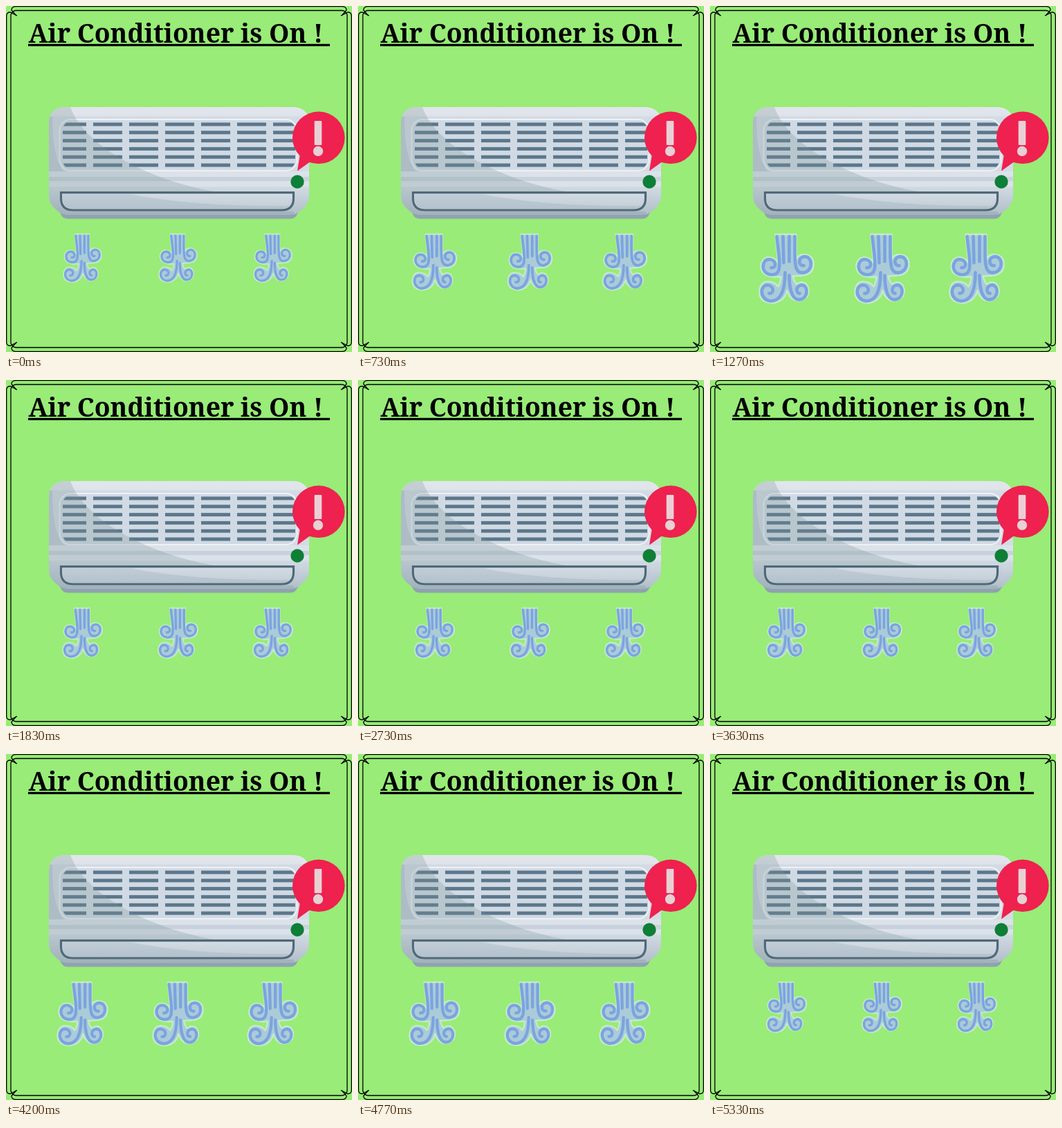
Animation of 500x500 px, one loop 5360 ms. Source, as an HTML page:

```html
<!DOCTYPE html>
<html lang="en">
<head>
<meta charset="utf-8">
<title>Air Conditioner</title>
<style>
  html, body { margin: 0; width: 100%; height: 100%; overflow: hidden; background: #98ec77; }
  svg { display: block; width: 100vw; height: 100vh; }
  text { font: bold 36px "Noto Serif", serif; }
</style>
</head>
<body>
<svg viewBox="0 0 500 500">
  <defs>
    <linearGradient id="shell" x2="0" y2="1">
      <stop offset="0" stop-color="#e2e6ec"/>
      <stop offset=".08" stop-color="#dfe4ea"/>
      <stop offset=".09" stop-color="#d3dbe4"/>
      <stop offset=".72" stop-color="#d3dce5"/>
      <stop offset="1" stop-color="#b1bec9"/>
    </linearGradient>
    <linearGradient id="lip" x2="0" y2="1">
      <stop offset="0" stop-color="#d5dde5"/>
      <stop offset="1" stop-color="#bfcbd5"/>
    </linearGradient>
    <clipPath id="bodyClip"><path id="body" d="M86 146H414Q438 146 438 170V274Q438 286 428 294Q420 302 410 302H90Q80 302 72 294Q62 286 62 274V170Q62 146 86 146Z"/></clipPath>
    <clipPath id="ventClip"><rect x="82" y="166" width="336" height="70" rx="13"/></clipPath>

    <!-- One gust: 100 units tall, centred on x = 0 -->
    <g id="wind" stroke-linecap="round" stroke-linejoin="round">
      <path fill="#abcbd8" stroke="#c6e9cb" stroke-width="2.5" d="M-16 1L14 1V37Q17 30 25 30Q39 31 39 44Q39 58 24 60Q14 61 9 61Q11 70 15 73Q21 67 28 72Q35 80 30 90Q22 99 12 96Q4 92 1 82Q-3 98-20 100Q-39 99-39 84Q-38 69-27 69Q-17 69-12 76Q-8 70-8 62Q-14 63-20 62Q-37 60-37 46Q-35 34-24 34Q-16 35-12 42Z"/>
      <g fill="none" stroke="#7aa4e0" stroke-width="4.6">
        <path d="M-14 4L-11 30C-9 48-9 60-22 59C-38 57-36 37-25 37C-14 37-14 50-22 49"/>
        <path d="M12 4V27C12 46 13 58 25 56C39 53 38 33 26 33C16 34 17 47 25 46"/>
        <path d="M-5 4L-4 42M4 4V40"/>
        <path d="M-2 56C-2 76-6 97-23 97C-39 95-39 74-27 74C-17 75-18 87-25 86"/>
        <path d="M4 60C4 76 7 95 18 95C32 94 32 74 22 74C13 75 13 86 19 86"/>
      </g>
    </g>
    <g id="corner" fill="none" stroke="#000" stroke-width="1.3">
      <path d="M250 .7H14Q8 1 8 6L15 14M250 6.5H14Q9 7 7 13V250"/>
      <path d="M.7 250V14Q1 9 6 9L16 14"/>
    </g>
  </defs>

  <rect width="500" height="500" fill="#98ec77"/>
  <use href="#corner"/>
  <use href="#corner" transform="matrix(-1 0 0 1 500 0)"/>
  <use href="#corner" transform="matrix(1 0 0 -1 0 500)"/>
  <use href="#corner" transform="matrix(-1 0 0 -1 500 500)"/>

  <text id="title" x="32.5" y="52.6">Air Conditioner is On !</text>
  <rect x="32" y="54.8" width="436" height="3.3"/>

  <path d="M77 297H423L419 304Q416 307.5 410 307.5H90Q84 307.5 81 304Z" fill="#8fa2b1"/>
  <use href="#body" fill="url(#shell)"/>
  <g clip-path="url(#bodyClip)">
    <path d="M62 239H438V247H62ZM62 253H438V261H62Z" fill="#e3e8ee" opacity=".55"/>
    <path d="M62 247H438V253H62Z" fill="#c3ced9" opacity=".7"/>
    <path d="M62 160H67C67 200 72 225 84 239H62Z" fill="#8fa0ad" opacity=".25"/>
  </g>
  <rect x="77.5" y="164" width="343" height="74" rx="16" fill="#d0dae4" stroke="#eef2f6" stroke-width="1.8"/>
  <g id="slats" fill="#5c778b" clip-path="url(#ventClip)"></g>
  <path d="M79.5 269.7H415.5V278Q415.5 295 398 295H97Q79.5 295 79.5 278Z" fill="url(#lip)" stroke="#4f6978" stroke-width="3.2"/>
  <path d="M82 272H180Q270 290 410 289Q405 293 396 293H98Q82 293 82 279Z" fill="#90a4b3" opacity=".28"/>
  <g clip-path="url(#bodyClip)" fill="#7b9298" opacity=".28">
    <path d="M62 146H93C112 200 200 250 300 268H62Z"/>
    <path d="M62 268H78V282Q79 297 97 297H416V302H62Z"/>
  </g>

  <circle cx="421" cy="254" r="9.7" fill="#0e7f37"/>
  <path d="M425 214L421 238.5L441 224Z" fill="#ee214f"/>
  <circle cx="451.8" cy="190.3" r="37.8" fill="#ee214f"/>
  <rect x="445.7" y="166" width="10.6" height="35" rx="1" fill="#e8d0d5"/>
  <circle cx="451" cy="209.8" r="7.2" fill="#e8d0d5"/>

  <g id="winds"></g>
</svg>
<script>
  const $ = id => document.getElementById(id);
  const make = (tag, attrs, parent) => {
    const el = document.createElementNS("http://www.w3.org/2000/svg", tag);
    for (const key in attrs) el.setAttribute(key, attrs[key]);
    return parent.appendChild(el);
  };

  // Size the title to the length of its underline, less the trailing space
  const title = $("title");
  title.style.fontSize = 36 * 426 / title.getComputedTextLength() + "px";

  for (let row = 0; row < 6; row++)
    for (let col = 0; col < 7; col++)
      make("rect", { x: 74 + col * 52, y: 168.5 + row * 11.8, width: 42, height: 5 }, $("slats"));

  const centers = [110.5, 248.5, 385.5];
  const winds = centers.map(() => make("use", { href: "#wind" }, $("winds")));

  const LOOP = 5360, PULSE = 900, FPS = 30;
  const start = performance.now();

  function draw(now) {
    const t = Math.max(0, now - start) % LOOP;
    const step = Math.floor((t + 4) * FPS / 1000) * 1000 / FPS;
    const phase = (step + 15) % PULSE / PULSE;
    const height = 69 + 37 * (1 - Math.abs(1 - 2 * phase));
    winds.forEach((wind, i) =>
      wind.setAttribute("transform", `translate(${centers[i]} 329) scale(${height / 100})`));
    requestAnimationFrame(draw);
  }
  draw(start);
</script>
</body>
</html>
```
